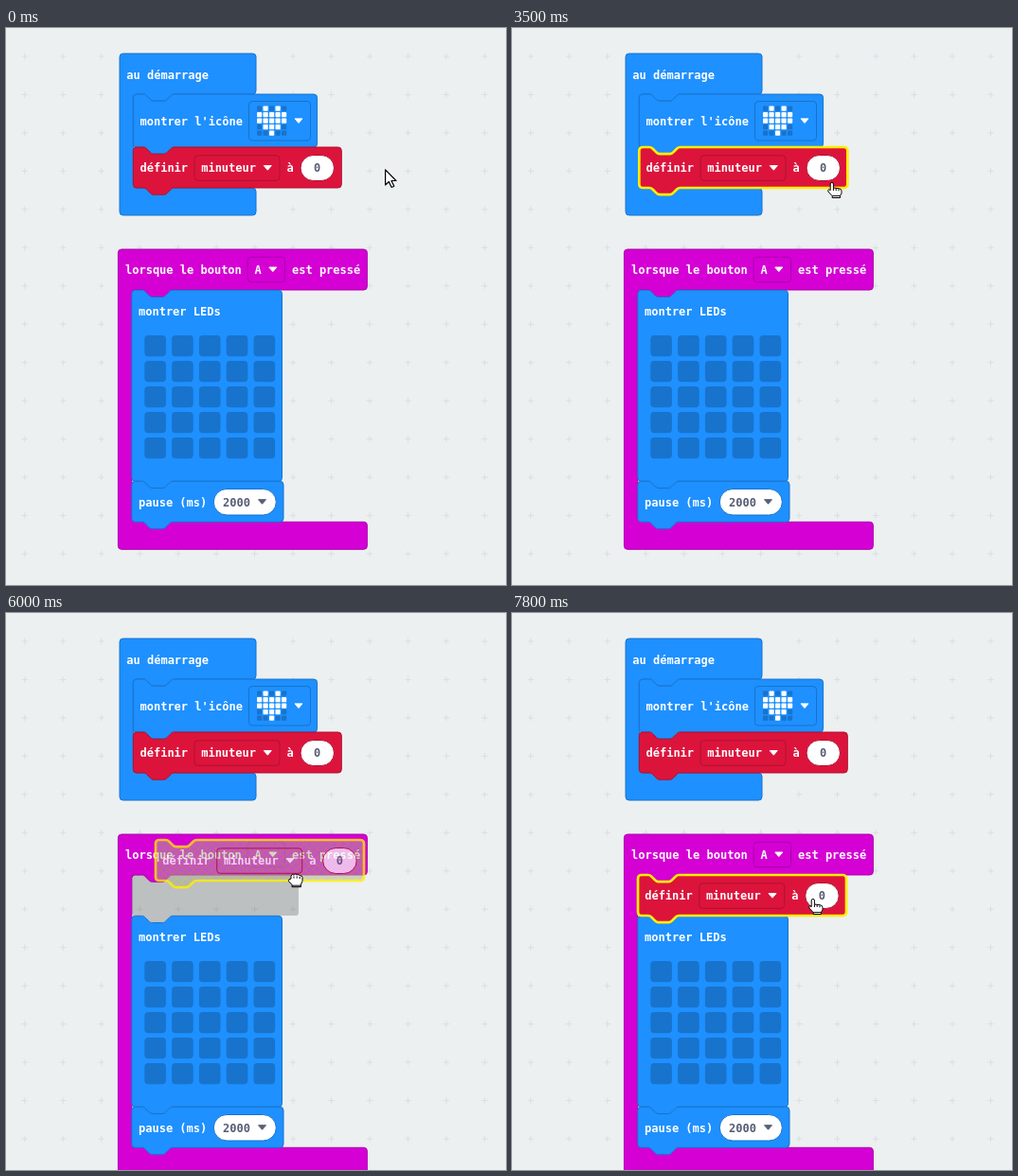
Write an HTML page that moves like this. It is 528 px wide and 589 px high and loops after 8 s.

```html
<!DOCTYPE html>
<html lang="fr">
<head>
<meta charset="utf-8">
<title>Dupliquer un bloc</title>
<style>
html, body { margin: 0; width: 100%; height: 100%; overflow: hidden; background: #ecf0f1; }
svg { display: block; width: 528px; height: 589px; }
text { font: bold 12px "DejaVu Sans Mono", monospace; fill: #fff; white-space: pre; }
.blue { --fill: #1e90ff; --edge: #1873cc; }
.red { --fill: #dc143c; --edge: #b01030; }
.magenta { --fill: #d400d4; --edge: #aa00aa; }
.block { fill: var(--fill); stroke: var(--edge); }
.field { fill: none; stroke: var(--edge); }
.oval { fill: #fff; stroke: var(--edge); }
.arrow { fill: #fff; stroke: #fff; stroke-linejoin: round; }
.dark { fill: #575e75; }
.arrow.dark { stroke: #575e75; }
.led { fill: var(--edge); }
.lit { fill: #fff; }
.selected .block, .halo { stroke: #ffee00; stroke-width: 2.7; }
.halo { fill: none; }
.disabled .block { fill: url(#hatch); fill-opacity: .65; }
.disabled .oval { fill-opacity: .85; }
#marker { fill: #000; fill-opacity: .2; }
#menu text { font: 13px "Liberation Sans", Arial, sans-serif; fill: #000; }
#menu .panel { fill: #fff; filter: drop-shadow(0 1px 2px rgba(0, 0, 0, .35)); }
#cursor path { fill: #fff; stroke: #000; stroke-linejoin: round; }
#cursor .lines { fill: none; }

.anim { animation: 8s step-end infinite; }
#cursor { animation-name: point; }
#arrow { animation-name: arrow; }
#hand { animation-name: hand; }
#fist { animation-name: fist; }
#picked { animation-name: picked; }
#menu { animation-name: menu; }
#hover { animation-name: hover; }
#copy { animation-name: drag; }
#copyLook { animation-name: copy; }
#copyOff { animation-name: until-enabled; }
#copyOn { animation-name: since-enabled; }
#marker { animation-name: marker; }
#short { animation-name: until-open; }
#tall { animation-name: since-open; }
#lower { animation-name: lower; }

@keyframes point {
  0% { transform: translate(400px, 149px); animation-timing-function: steps(4); }
  5% { transform: translate(356px, 144px); animation-timing-function: steps(4); }
  10% { transform: translate(314px, 162px); }
  11.25% { transform: translate(314px, 162px); animation-timing-function: steps(3); }
  15% { transform: translate(311px, 156px); }
  22.5% { transform: translate(310px, 157px); }
  26.25% { transform: translate(310px, 157px); animation-timing-function: steps(3); }
  30% { transform: translate(338px, 163px); }
  47.5% { transform: translate(338px, 163px); animation-timing-function: steps(3); }
  51.25% { transform: translate(328px, 208px); animation-timing-function: steps(4); }
  56.25% { transform: translate(312px, 250px); animation-timing-function: steps(2); }
  58.75% { transform: translate(321px, 248px); }
  63.75% { transform: translate(321px, 248px); animation-timing-function: steps(6); }
  71.25% { transform: translate(313px, 256px); animation-timing-function: steps(3); }
  75% { transform: translate(302px, 276px); animation-timing-function: steps(2); }
  77.5% { transform: translate(291px, 298px); }
  78.75% { transform: translate(291px, 298px); animation-timing-function: steps(5); }
  85% { transform: translate(286px, 308px); }
  92.5% { transform: translate(286px, 308px); animation-timing-function: steps(2); }
  95% { transform: translate(300px, 311px); animation-timing-function: steps(2); }
  97.5%, 100% { transform: translate(318px, 302px); }
}
@keyframes drag {
  0% { transform: translate(0, 0); }
  63.75% { transform: translate(0, 0); animation-timing-function: steps(6); }
  71.25% { transform: translate(-8px, 8px); animation-timing-function: steps(3); }
  75% { transform: translate(-19px, 28px); animation-timing-function: steps(2); }
  77.5% { transform: translate(-32px, 53px); }
  78.75% { transform: translate(-32px, 53px); animation-timing-function: steps(5); }
  85% { transform: translate(-37px, 62px); }
  90%, 100% { transform: translate(-44px, 65px); }
}
@keyframes arrow { 0%, 22.5%, 48.75% { opacity: 1; } 5%, 27.5%, 52.5%, 100% { opacity: 0; } }
@keyframes hand { 0%, 22.5%, 48.75%, 65% { opacity: 0; } 5%, 27.5%, 52.5%, 90%, 100% { opacity: 1; } }
@keyframes fist { 0%, 90%, 100% { opacity: 0; } 65% { opacity: 1; } }
@keyframes picked { 0%, 45%, 100% { opacity: 0; } 21.25% { opacity: 1; } }
@keyframes menu { 0%, 43.75%, 100% { opacity: 0; } 22.5% { opacity: 1; } }
@keyframes hover { 0%, 100% { opacity: 0; } 27.5% { opacity: 1; } }
@keyframes copy { 0% { opacity: 0; } 45%, 90%, 100% { opacity: 1; } 65% { opacity: .8; } }
@keyframes until-enabled { 0% { opacity: 1; } 91.25%, 100% { opacity: 0; } }
@keyframes since-enabled { 0% { opacity: 0; } 91.25%, 100% { opacity: 1; } }
@keyframes marker { 0%, 90%, 100% { opacity: 0; } 75% { opacity: 1; } }
@keyframes until-open { 0% { opacity: 1; } 75%, 100% { opacity: 0; } }
@keyframes since-open { 0% { opacity: 0; } 75%, 100% { opacity: 1; } }
@keyframes lower { 0% { transform: none; } 75%, 100% { transform: translateY(43px); } }
</style>
</head>
<body>
<svg id="stage" viewBox="0 0 528 589"></svg>
<script>
const R = 3.6, ARM = 14.4, NOTCH_X = 10.8;

// Connector outline, drawn rightwards (s = 1) or leftwards (s = -1).
const notch = s => `c${1.8 * s},0 ${2.7 * s},.9 ${3.6 * s},1.8 l${3.6 * s},3.6
  c${.9 * s},.9 ${1.8 * s},1.8 ${3.6 * s},1.8 h${10.8 * s}
  c${1.8 * s},0 ${2.7 * s},-.9 ${3.6 * s},-1.8 l${3.6 * s},-3.6 c${.9 * s},-.9 ${1.8 * s},-1.8 ${3.6 * s},-1.8`;
const arc = (dx, dy, sweep = 1) => `a${R},${R} 0 0 ${sweep} ${dx * R},${dy * R}`;

const stackPath = (x, y, w, h) => `M${x},${y + R}${arc(1, -1)}H${x + NOTCH_X}${notch(1)}
  H${x + w - R}${arc(1, 1)}V${y + h - R}${arc(-1, 1)}H${x + NOTCH_X + 32.4}${notch(-1)}H${x + R}${arc(-1, -1)}Z`;

const wrapPath = (x, y, w, inner, foot) => {
  const top = y + 43, bottom = top + inner, right = x + w, left = x + ARM;
  return `M${x},${y + R}${arc(1, -1)}H${right - R}${arc(1, 1)}V${top - R}${arc(-1, 1)}
    H${left + NOTCH_X + 32.4}${notch(-1)}H${left + R}${arc(-1, 1, 0)}V${bottom - R}${arc(1, 1, 0)}
    H${right - R}${arc(1, 1)}V${bottom + foot - R}${arc(-1, 1)}H${x + R}${arc(-1, -1)}Z`;
};

const block = (d, attrs = '') => `<path class="block" d="${d}" ${attrs}/>`;
const label = (x, mid, s, cls = '') => `<text class="${cls}" x="${x}" y="${mid + 4}">${s}</text>`;
const arrow = (x, y, cls = '') => `<path class="arrow ${cls}" d="M${x - 4},${y - 2.3}h8l-4,4.6z"/>`;
const box = (cls, x, y, w, h, r) => `<rect class="${cls}" x="${x}" y="${y}" width="${w}" height="${h}" rx="${r}"/>`;
const dropdown = (x, mid, w, s) =>
  box('field', x, mid - 13.5, w, 26.5, 3.6) + label(x + 7.2, mid, s) + arrow(x + w - 12.7, mid - .4);

const setVariable = (x, y) => {
  const mid = y + 22.3;
  return block(stackPath(x, y, 220, 43)) + label(x + 7.2, mid, 'définir') +
    dropdown(x + 64.7, mid, 90, 'minuteur') + label(x + 162.2, mid, 'à') +
    box('oval', x + 176.7, mid - 13.8, 35.5, 27, 13.5) + label(x + 190.7, mid, '0', 'dark');
};

const heart = ['.#.#.', '#####', '#####', '.###.', '..#..'].map((row, r) =>
  [...row].map((c, i) => box(c === '#' ? 'lit' : 'led', 265 + 6.5 * i, 82.5 + 6.5 * r, 5.2, 5.2, .8)).join('')).join('');
const leds = Array.from({ length: 25 }, (_, i) =>
  box('led', 146.3 + 28.8 * (i % 5), 325 + 27 * Math.floor(i / 5), 22.6, 22.3, 4)).join('');
const items = ['Dupliquer', 'Ajouter un commentaire', 'Supprimer les blocs', 'Aide', "Crée 'get minuteur'"]
  .map((s, i) => `<text x="326" y="${183 + 39.2 * i}">${s}</text>`).join('');

document.getElementById('stage').innerHTML = `
<defs>
  <pattern id="grid" x="-.5" y="9.7" width="40.47" height="40.47" patternUnits="userSpaceOnUse">
    <path d="M17.1,20.2h6.4M20.3,17v6.4" stroke="#bdc3c7" stroke-opacity=".4"/>
  </pattern>
  <pattern id="hatch" x="177" y="212" width="9" height="9" patternUnits="userSpaceOnUse">
    <rect width="9" height="9" fill="#aaa"/><path d="M0,0L9,9M9,0L0,9" stroke="#cc0" stroke-width=".9"/>
  </pattern>
</defs>
<rect width="528" height="589" fill="#ecf0f1"/>
<rect width="528" height="589" fill="url(#grid)"/>

<g class="blue">
  ${block(wrapPath(120, 27, 144, 99.3, 28.7))}${label(127.3, 49.5, 'au démarrage')}
  ${block(stackPath(134.3, 70, 194.3, 56))}${label(141.5, 98.6, "montrer l'icône")}
  ${box('field', 256.5, 77.5, 65, 41.5, 3.6)}${heart}${arrow(309, 98.2)}
</g>
<g class="red">${setVariable(134.3, 126)}</g>
<path id="picked" class="halo anim" d="${stackPath(134.3, 126, 220, 43)}"/>

<g class="magenta">
  ${block(wrapPath(118.4, 234, 263, 245.3, 29), 'id="short"').replace('"block"', '"block anim"')}
  ${block(wrapPath(118.4, 234, 263, 288.3, 29), 'id="tall"').replace('"block"', '"block anim"')}
  ${label(126, 255.7, 'lorsque le bouton')}${dropdown(255.2, 255.7, 39.3, 'A')}${label(302, 255.7, 'est pressé')}
</g>
<path id="marker" class="anim" d="${stackPath(133, 277, 176, 43)}"/>
<g id="lower" class="blue anim">
  ${block(stackPath(132.8, 277.3, 158.7, 202))}${label(140, 299.8, 'montrer LEDs')}${leds}
  ${block(stackPath(132.8, 479.3, 160.2, 43))}${label(140, 501.6, 'pause (ms)')}
  ${box('oval', 219.3, 487.5, 66, 27.5, 13.7)}${label(229, 501.6, '2000', 'dark')}${arrow(270.5, 501, 'dark')}
</g>

<g id="copy" class="red selected anim"><g id="copyLook" class="anim">
  <g id="copyOff" class="disabled anim">${setVariable(177, 212)}</g>
  <g id="copyOn" class="anim">${setVariable(177, 212)}</g>
</g></g>

<g id="menu" class="anim">
  <rect class="panel" x="310.5" y="158.5" width="183.5" height="194.5" rx="2"/>
  <rect id="hover" class="anim" x="311" y="159" width="169" height="39" fill="#f1f1f1"/>
  ${items}
  <rect x="480" y="159" width="13.5" height="194" fill="#f1f1f1"/>
  <rect x="481" y="174" width="11" height="162" fill="#c1c1c1"/>
  <path d="M483,169h7l-3.5,-4z" fill="#8f8f8f"/><path d="M483,343h7l-3.5,4z" fill="#404040"/>
</g>

<g id="cursor" class="anim">
  <path id="arrow" class="anim" stroke-width="1.2" d="M.6,.8V17l3.7,-3.5l2.9,6l2.6,-1.2l-2.8,-5.8h5z"/>
  <g id="hand" class="anim">
    <path d="M-1.8,2a1.6,1.6 0 0 1 3.2,0V6l6.2,.8q2.4,.4 2.4,2.6v2.4l-1.5,2.6v2.1H.2v-1.8L-4.1,10q-.7,-1.9 .9,-2.3l1.4,1z"/>
    <path class="lines" d="M1.4,6v3M4.2,7v2M7,7.3v2M.2,14.6h8.3"/>
  </g>
  <g id="fist" class="anim">
    <path d="M-1,3.6V2q1.2,-2.6 3,-.9q1.5,-2 3.2,-.1q1.9,-1.2 3,.7q2.4,-.4 2.8,1.8v4.2l-1.6,3.4v2.6H0v-2.3L-3.5,7.6q-.4,-2.6 2.5,-2.6z"/>
    <path class="lines" d="M2,2.5v2M5.2,2.5v2M8.2,3v2M0,12.2h9.4"/>
  </g>
</g>`;
</script>
</body>
</html>
```
